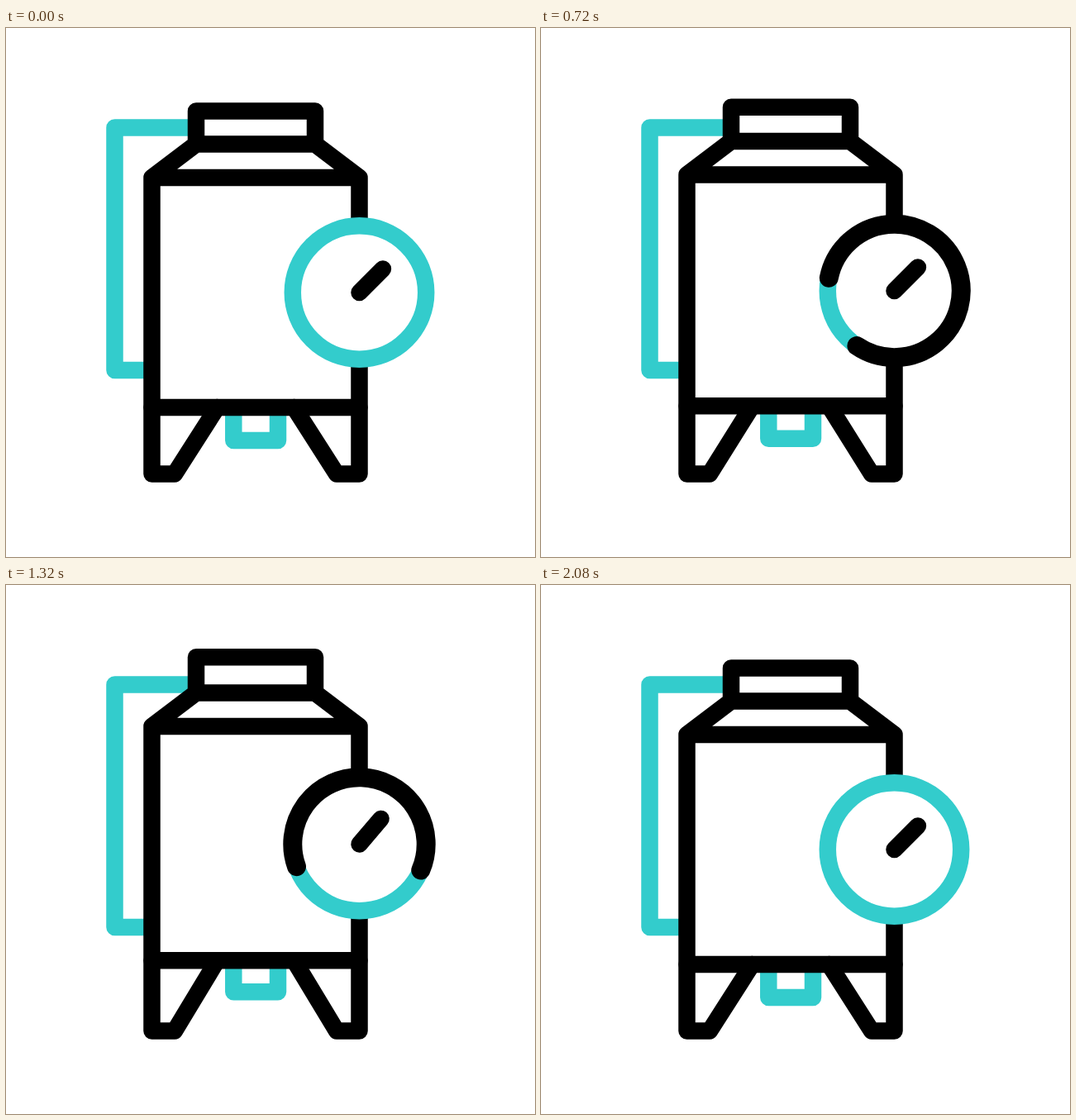
An HTML page for the animation above (2240 ms loop, 640x640 px).

```html
<!DOCTYPE html>
<html lang="en">
<head>
<meta charset="utf-8">
<title>Pressure tank</title>
<style>
  html, body { margin: 0; width: 100%; height: 100%; overflow: hidden; background: #fff; }
  svg { display: block; width: 100vw; height: 100vh; }
  path, circle, line { fill: none; stroke: #000; stroke-width: 20.5; stroke-linecap: round; stroke-linejoin: round; }
  .teal { stroke: #33cccc; }
  .filled { fill: #fff; }
  .arc { stroke-width: 23; }
</style>
</head>
<body>
<svg viewBox="0 0 640 640">
  <path class="teal" d="M230 120.5H131.5V414H176.5"/>
  <path class="teal" id="drain"/>
  <path class="filled" id="tank"/>
  <path id="legs"/>
  <g id="gauge">
    <circle class="teal filled" cx="427.5" cy="320" r="80.7"/>
    <path class="arc"/>
    <path class="arc"/>
    <line id="needle" x1="427.5" y1="320" x2="427.5" y2="279.8"/>
  </g>
</svg>
<script>
const LOOP = 2240, STEP = 40;
const CX = 427.5, CY = 320, R = 80.7;
const $ = id => document.getElementById(id);
const arcs = document.querySelectorAll('.arc');

// Eased progress from 0 to 1 between two steps
function ease(n, from, to) {
  const t = Math.min(1, Math.max(0, (n - from) / (to - from)));
  return t * t * (3 - 2 * t);
}

// Repeated 0 -> 1 -> 0 swing
function swing(n, start, period, cycles) {
  const t = n - start;
  if (t <= 0 || t >= period * cycles) return 0;
  const phase = t % period / period * 2;
  return ease(phase < 1 ? phase : 2 - phase, 0, 1);
}

function drawTank(v) {
  const top = 100.5 - 18 * v;
  const neck = 140.5 - 13.5 * v;
  const shoulder = 181 - 13.5 * v;
  const base = 459 - 6.5 * v;
  const drain = 499 - 9 * v;
  $('drain').setAttribute('d', `M275.3 ${base}V${drain}H329V${base}`);
  $('tank').setAttribute('d',
    `M230 ${neck}V${top}H374V${neck}L427.5 ${shoulder}V${base}H176.5V${shoulder}Z` +
    `M230 ${neck}H374M176.5 ${shoulder}H427.5`);
  $('legs').setAttribute('d',
    `M176.5 ${base}V539.5H204L255.5 ${base}M427.5 ${base}V539.5H400L348.5 ${base}`);
}

function point(deg) {
  const a = deg * Math.PI / 180;
  return `${CX + R * Math.sin(a)} ${CY - R * Math.cos(a)}`;
}

function drawArc(el, n) {
  const turn = 179.7 + 235 * ease(n, 8, 30);
  const tail = turn + 360 * ease(n, 18, 30);
  const head = turn + 360 * ease(n, 8, 21.8);
  const len = head - tail;
  el.setAttribute('d', len < 0.1 ? '' :
    `M${point(tail)}A${R} ${R} 0 0 1 ${point(tail + len / 2)}A${R} ${R} 0 0 1 ${point(head)}`);
}

function draw(n) {
  drawTank(swing(n, 5, 6, 7));
  $('gauge').setAttribute('transform', `translate(0 ${-13 * swing(n, 3, 8, 6)})`);
  $('needle').setAttribute('transform', `rotate(${45 - 23 * swing(n, 4, 7, 6)} ${CX} ${CY})`);
  arcs.forEach((el, i) => drawArc(el, n - 17 * i));
}

function tick() {
  draw(Math.floor(performance.now() % LOOP / STEP));
  requestAnimationFrame(tick);
}
tick();
</script>
</body>
</html>
```
